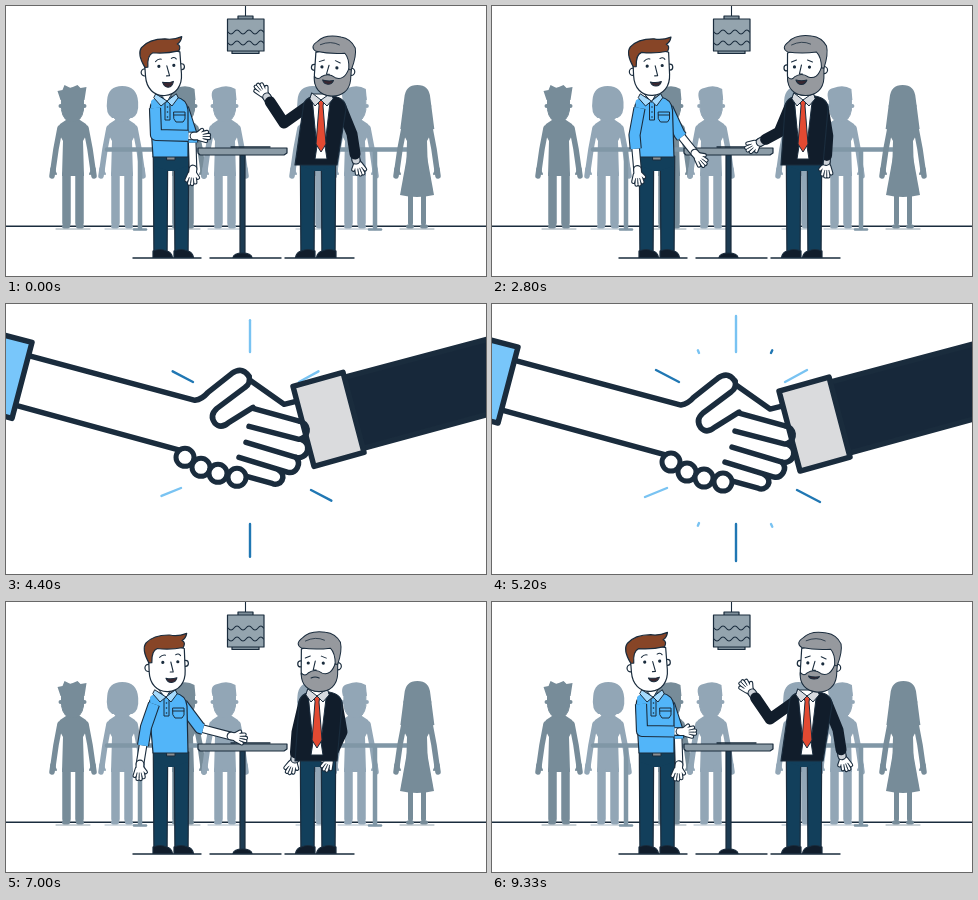
Animation, 480 px wide and 270 px high, one loop 9390 ms. Source, as an HTML page with a canvas:

```html
<!DOCTYPE html>
<html lang="en">
<head>
<meta charset="utf-8">
<title>Meeting at the table</title>
<style>
html, body { margin: 0; height: 100%; overflow: hidden; background: #fff; }
canvas { display: block; }
</style>
</head>
<body>
<canvas id="stage" width="480" height="270"></canvas>
<script>
const ctx = document.getElementById('stage').getContext('2d');
const LOOP = 9390, INK = '#1a2c3d', PANTS = '#123f5b', SHIRT = '#52b5f9', JACKET = '#111d2b';
ctx.lineCap = ctx.lineJoin = 'round';

const clamp = v => Math.max(0, Math.min(1, v));
const smooth = v => (v = clamp(v), v * v * (3 - 2 * v));
const wave = (t, cycles, shift = 0) => Math.sin(t / LOOP * cycles * 2 * Math.PI + shift);

function shape(d, fill, stroke = INK, width = 1.2) {
  const path = new Path2D(d);
  if (fill) { ctx.fillStyle = fill; ctx.fill(path); }
  if (stroke) { ctx.strokeStyle = stroke; ctx.lineWidth = width; ctx.stroke(path); }
}
const line = (d, color = INK, width = 1.2) => shape(d, null, color, width);
const dot = (x, y, r, fill, stroke, width) =>
  shape(`M${x - r} ${y}a${r} ${r} 0 1 0 ${2 * r} 0a${r} ${r} 0 1 0 ${-2 * r} 0Z`, fill, stroke, width);
function tube(d, color, width) {
  line(d, INK, width + 2.2);
  line(d, color, width);
}
function at(x, y, angle, draw) {
  ctx.save();
  ctx.translate(x, y);
  ctx.rotate(angle);
  draw();
  ctx.restore();
}

// Pose: chin x, chest x, then per arm: elbow x y, wrist x y, hand angle, sleeve share of the forearm
const LEFT = {
  point: [159, 162, 150, 129, 188, 130, 0, .85, 186, 130, 187, 163, 1.7, .2],
  table: [156, 159, 141, 130, 149, 162, 1.5, .5, 193, 126, 223, 133, .2, .1],
  rest: [165, 162, 144, 128, 142, 163, 1.5, .3, 182, 130, 183, 163, 1.5, .2],
  reach: [162, 161, 140, 125, 134, 161, 1.6, .5, 194, 126, 225, 135, .2, .1]
};
const RIGHT = {
  greet: [325, 318, 278, 117, 262, 91, -2.15, 1, 346, 128, 350, 154, 1.2, 1],
  offer: [313, 314, 285, 124, 258, 124, 3.14, 1, 334, 130, 331, 157, 1.6, 1],
  rest: [314, 314, 291, 130, 287, 158, 1.7, 1, 339, 130, 340, 155, 1.5, 1],
  open: [313, 314, 291, 130, 289, 157, 2, 1, 336, 130, 325, 155, 2, 1]
};
const LEFT_KEYS = [[0, 'point'], [700, 'point'], [1300, 'table'], [2500, 'table'], [3100, 'rest'],
  [6400, 'rest'], [6850, 'reach'], [7700, 'reach'], [8400, 'point'], [LOOP, 'point']];
const RIGHT_KEYS = [[0, 'greet'], [800, 'greet'], [1300, 'offer'], [2600, 'offer'], [3100, 'rest'],
  [6500, 'rest'], [6900, 'open'], [7700, 'open'], [8400, 'greet'], [LOOP, 'greet']];

function poseAt(keys, poses, t) {
  const i = keys.findIndex(key => key[0] > t);
  const [t0, from] = keys[i - 1], [t1, to] = keys[i];
  const k = smooth((t - t0) / (t1 - t0));
  return poses[from].map((v, n) => v + (poses[to][n] - v) * k);
}

function hand(x, y, angle, flip) {
  at(x, y, angle, () => {
    ctx.scale(1, flip);
    const fingers = 'M5 -2L13 -4M6 -.5L15 -1M6 1.500L15 2M5 3L12 5M2 -1L8 -6';
    line('M0 0H6', INK, 8.8);
    tube(fingers, '#fff', 2.2);
    line('M0 0H6', '#fff', 6.6);
    line('M9 -1.500L13 -2.400M9 .5H14M9 2.500L13 3.500', INK, .7);
  });
}

function arm(x, y, [ex, ey, wx, wy, angle, share], color, flip) {
  const cx = ex + (wx - ex) * share, cy = ey + (wy - ey) * share;
  if (share < 1) tube(`M${ex} ${ey}L${wx} ${wy}`, '#fff', 6.5);
  hand(wx, wy, angle, flip);
  if (share === 1) {
    const len = Math.hypot(wx - ex, wy - ey), ux = (wx - ex) / len, uy = (wy - ey) / len;
    tube(`M${wx - ux * 3} ${wy - uy * 3}L${wx} ${wy}`, '#cdd2d8', 7);
    line(`M${x} ${y}L${ex} ${ey}L${wx - ux * 6} ${wy - uy * 6}`, color, 11);
    return;
  }
  ctx.lineCap = 'butt';
  tube(`M${x} ${y}L${ex} ${ey}L${cx} ${cy}`, color, 10);
  ctx.lineCap = 'round';
}

function legs(x, dir) {
  for (const side of [-10.5, 10.5]) {
    const cx = x + side;
    shape(`M${cx - 7.2} 150H${cx + 7.2}L${cx + 6.6} 246H${cx - 6.6}Z`, PANTS);
    at(cx, 0, 0, () => {
      ctx.scale(dir, 1);
      shape('M-7.500 251.500V245Q0 242 6 245Q11 246 12 251.500Z', JACKET);
    });
  }
  shape(`M${x - 17} 149H${x + 17}V160L${x + 3} 165H${x - 3}L${x - 17} 160Z`, PANTS, null);
  shape(`M${x - 4} 150h8v4h-8Z`, '#8c8f92', INK, 1);
}

function eyes(xs, y, blink) {
  for (const x of xs) blink ? line(`M${x - 2} ${y}h4`) : dot(x, y, 1.6, INK, null);
}

function mouth(x, y, open) {
  if (open > .6) shape(`M${x - 5.5} ${y - 1}Q${x} ${y + .5} ${x + 5.5} ${y - 1}Q${x + 4} ${y + open * 2} ${x} ${y + open * 2}Q${x - 4} ${y + open * 2} ${x - 5.5} ${y - 1}Z`, '#3a2730', INK, 1);
  else line(`M${x - 4} ${y + 1}Q${x} ${y - 1} ${x + 4} ${y + 1}`, INK, 1.1);
}

const FACE = 'M-18 47V69C-18 81 -11 89.500 0 89.500C11 89.500 18 81 18 69V47Q0 40 -18 47Z';

function leftMan(t, blink) {
  const p = poseAt(LEFT_KEYS, LEFT, t), x = p[1];
  p[5] += wave(t, 11);
  p[11] += wave(t, 9);
  legs(165, 1);
  arm(x + 15, 102, p.slice(8), SHIRT, 1);
  shape(`M${x - 8} 91H${x + 8}Q${x + 19} 93 ${x + 20} 104L182 151H147L${x - 18} 104Q${x - 18} 93 ${x - 8} 91Z`, SHIRT);
  const c = x - 3;
  line(`M${c} 96V114H${c + 5}V97`, INK, 1);
  for (const y of [101, 106, 111]) dot(c + 2.5, y, .8, INK, null);
  shape(`M${x + 6} 106h11v7l-2 3h-7l-2 -3Z M${x + 6} 109h11`, null, INK, 1);
  arm(x - 13, 102, p.slice(2, 8), SHIRT, 1);
  line(`M${x - 13} 97L${x - 8} 96`, SHIRT, 8);
  shape(`M${c - 8} 84H${c + 9}L${c + 2} 96Z`, '#fff', INK, 1);
  shape(`M${c - 9} 88L${c + 2} 95L${c - 4} 100L${c - 11} 92ZM${c + 11} 88L${c + 2} 95L${c + 7} 100L${c + 13} 92Z`, '#a5dafd', INK, 1);
  const tilt = (p[0] - 165) * .012;
  at(p[0], 90 + .5 * wave(t, 10), tilt + .015 * wave(t, 8), () => {
    ctx.translate(0, -90);
    dot(-18.5, 65, 3.6, '#fff', INK, 1.2);
    dot(18.5, 62, 3, '#fff', INK, 1.2);
    shape(FACE, '#fff');
    shape('M-18 60Q-25 46 -20 40Q-12 32 4 33Q12 35 21 32Q20 37 16 39Q20 41 17 46Q4 48 -9 46Q-15 48 -15 60Z', '#874527');
    eyes([-4, 11], 60, blink);
    line('M-7 55Q-4 52 -1 53M9 53Q12 51 14 54', INK, 1);
    line('M4 60L6 70H3', INK, 1.1);
    mouth(4, 77, 2.2 + .7 * wave(t, 29));
  });
}

function rightMan(t, blink) {
  const p = poseAt(RIGHT_KEYS, RIGHT, t), x = p[1];
  const raised = clamp((120 - p[5]) / 29);
  p[4] += raised * 2 * wave(t, 13, -.6);
  p[6] += raised * .2 * wave(t, 13, -.6);
  p[11] += wave(t, 9);
  legs(312, -1);
  arm(x + 17, 101, p.slice(8), JACKET, -1);
  arm(x - 16, 100, p.slice(2, 8), JACKET, p[6] < 0 ? -1 : 1);
  shape(`M${x - 10} 90H${x + 9}Q${x + 22} 92 ${x + 22} 103L331 159H289L${x - 21} 103Q${x - 21} 92 ${x - 10} 90Z`, JACKET);
  const c = x - 3;
  shape(`M${c - 9} 88H${c + 10}L${c + 6} 122L${c + 4} 140L${c + 6} 153H${c - 6}L${c - 4} 140L${c - 6} 122Z`, '#fff', INK, 1);
  shape(`M${c - 3} 94H${c + 3}L${c + 2} 100L${c + 5} 138L${c} 146L${c - 5} 138L${c - 2} 100Z`, '#e34a32', INK, 1);
  shape(`M${c - 9} 87L${c} 94L${c - 6} 100L${c - 11} 93ZM${c + 10} 87L${c} 94L${c + 6} 100L${c + 12} 93Z`, '#d7dbe0', INK, 1);
  const talking = t < 1200 || t > 2700 && t < 4100 || t > 7900;
  at(p[0], 90 + .5 * wave(t, 9, 2), .015 * wave(t, 7) + (p[0] - 314) * .006, () => {
    ctx.translate(0, -90);
    dot(-18.5, 62, 3, '#fff', INK, 1.2);
    dot(18.5, 64, 3.6, '#fff', INK, 1.2);
    shape(FACE, '#fff');
    shape('M-18 71Q-14 75 -11 71Q-4 66 3 71Q12 74 16 61L18.500 62V72C18 83 11 89.500 0 89.500C-11 89.500 -18 83 -18 71Z', '#96999e', INK, 1);
    shape('M-18 46Q-25 42 -17 36Q-10 28 6 30Q16 31 21 40Q23 48 18.500 62H16Q16 51 11 46Q-4 48 -18 46Z', '#96999e', INK, 1);
    line('M-14 39Q-4 34 5 38', INK, .8);
    eyes([-11, 4], 61, blink);
    line('M-14 56L-9 54M2 54L7 56', INK, 1);
    line('M-4 59L-6 68H-3', INK, 1.1);
    mouth(-4, 75, talking ? 1.5 + .7 * wave(t, 27) : 0);
  });
}

// Background figures are flat shapes around x
function figure(x, color, hair, t) {
  at(x, 0, 0, () => {
    const woman = hair === 'long';
    line('M-13 122L-17 143L-20 164M13 122L17 143L20 164', color, 5.5);
    line('M-20 163L-21 170M20 163L21 170', color, 5.5);
    line('M-20 162L-17 168M20 162L17 168', color, 2);
    shape('M-4 112H4L13 118L16 124L10 135L11 170H-11L-10 135L-16 124L-13 118Z', color, null);
    if (woman) shape('M-9 145H9L17 189Q0 193 -17 189Z', color, null);
    line('M-6.500 168V217M6.500 168V217', color, woman ? 5 : 8.5);
    line('M-9 220.500H-5M5 220.500H9', color, 4);
    line('M-17 223H17', color, .8);
    ctx.translate(.6 * wave(t, 4, x), 0);
    shape('M-11 92Q-11 82 0 82Q11 82 11 92V104Q9 116 0 116Q-9 116 -11 104Z', color, color, 1);
    dot(-12, 100, 2, color, null);
    dot(12, 100, 2, color, null);
    if (woman) shape('M-13 92Q-12 79 0 79Q12 79 13 92L17 123Q0 128 -17 123Z', color, null);
    if (hair === 'round') shape('M-15 94Q-14 80 0 80Q15 80 16 96Q17 109 10 112H-10Q-17 108 -15 94Z', color, null);
    if (hair === 'spiky') shape('M-12 94L-15 85L-10 84L-8 79L-2 82L5 79L8 82L14 81L12 94Z', color, null);
    if (hair === 'short') shape('M-12 94Q-15 83 -7 82Q3 78 11 83L12 94Z', color, null);
  });
}

function backTable(from, to, stem) {
  const color = '#8097a6';
  line(`M${from} 143.500H${to}`, color, 4.5);
  line(`M${stem} 145V222`, color, 4.5);
  line(`M${stem - 6} 223.500H${stem + 6}`, color, 2.5);
}

function room(t) {
  line('M-2 220.200H482', INK, 1.4);
  const dark = '#778c99', light = '#92a6b6';
  figure(67, dark, 'spiky', t);
  figure(116, light, 'round', t);
  figure(177, dark, 'short', t);
  figure(219, light, 'short', t);
  figure(307, light, 'round', t);
  figure(349, light, 'short', t);
  backTable(101, 195, 134);
  backTable(330, 406, 369);
  figure(411, dark, 'long', t);

  line('M239.500 -300V10', INK, 1.1);
  shape('M232 10H247V14H232ZM226 44H253V47.500H226Z', '#7f909b');
  shape('M221.500 13H258V45H221.500Z', '#94a4ae');
  for (const y of [26, 37]) line(`M222 ${y}q3 4 6 0t6 0t6 0t6 0t6 0t5.500 0`, INK, 1.1);

  line('M127 252H195M204 252H275M279 252H348', INK, 1.4);
  shape('M234 149H239V249H234Z', '#1d3b52');
  shape('M227 251.500Q228 247 236.500 247Q245 247 246 251.500Z', JACKET);
  shape('M192 142H281V147L278 149H194L192 147Z', '#8b9ba6');
  line('M225 141H264', INK, 1.3);

  const blink = (t + 1500) % 3130 < 120;
  leftMan(t, blink);
  rightMan(t, blink);
}

function burst(t) {
  if (t < 4150) return;
  const pale = '#79c3f2', deep = '#2077b3', p = ((t - 4150) / 700) % 1;
  const ray = (x0, y0, x1, y1, color, late = 0) => {
    const q = p - late;
    const head = smooth(q * 2.2), tail = smooth(q * 2.2 - 1.2);
    if (head - tail < .01) return;
    const mix = (a, b, k) => a + (b - a) * k;
    line(`M${mix(x0, x1, tail)} ${mix(y0, y1, tail)}L${mix(x0, x1, head)} ${mix(y0, y1, head)}`, color, 2.4);
  };
  ray(244, 48, 244, 12, pale);
  ray(244, 220, 244, 257, deep);
  ray(187, 78, 164, 66, deep);
  ray(293, 78, 315, 66, pale);
  ray(175, 184, 153, 193, pale);
  ray(305, 186, 328, 198, deep);
  ray(207, 49, 198, 28, pale, .4);
  ray(279, 49, 289, 28, deep, .4);
  ray(207, 219, 198, 240, pale, .4);
  ray(279, 220, 289, 241, pale, .4);
}

function handshake(t) {
  burst(t);
  const W = 5.5;
  at(0, 6 * Math.sin((t - 5200) / 700 * 2 * Math.PI), 0, () => {
    shape('M500 35L338 78L357 149L500 110Z', '#17283a', INK, W);
    shape('M0 50L189 100Q196 99 202 93L226 74Q236 68 243 77L278 105L290 103L306 160L290 166L270 182L236 184L178 153L0 104Z', '#fff', null);
    line('M18 55L189 101Q196 100 202 93L226 74Q236 67 243 77', INK, W);
    line('M10 106L178 152', INK, W);
    line('M244 81L278 105L290 102', INK, W);
    shape('M243 77Q247 84 239 91L223 105Q228 111 219 124Q211 129 206 121Q204 116 211 109L238 87', '#fff', null);
    line('M243 77Q245 84 239 88L211 109Q203 116 209 124Q215 130 223 123L247 108', INK, W);
    line('M247 109L294 122A9 9 0 0 1 293 140L243 127', INK, W);
    line('M295 140A9 9 0 0 1 290 158L240 143', INK, W);
    line('M290 158A9 9 0 0 1 282 173L233 158', INK, W);
    line('M273 171A7 7 0 0 1 266 184L237 176', INK, W);
    for (const [x, y] of [[179, 158], [195, 168], [212, 174], [231, 178]]) dot(x, y, 9, '#fff', INK, 5);
    shape('M287 87L337 73L358 153L308 167Z', '#dadbdd', INK, W);
    line('M294 122A9 9 0 0 1 296 139', INK, W);
    shape('M-40 26L26 43L6 119L-40 107Z', '#78c6fa', INK, W);
  });
}

function frame(now) {
  const t = now % LOOP;
  const leave = smooth((t - 3850) / 300);
  const back = 1 - (1 - clamp((t - 5930) / 305)) ** 3;
  ctx.fillStyle = '#fff';
  ctx.fillRect(0, 0, 480, 270);
  if (leave < 1) at(0, -270 * leave, 0, () => room(t));
  if (leave > 0 && back < 1) at(0, 270 * (1 - leave - back), 0, () => handshake(t));
  if (back > 0) at(0, 270 * (1 - back), 0, () => room(t));
  requestAnimationFrame(frame);
}

requestAnimationFrame(frame);
</script>
</body>
</html>
```
